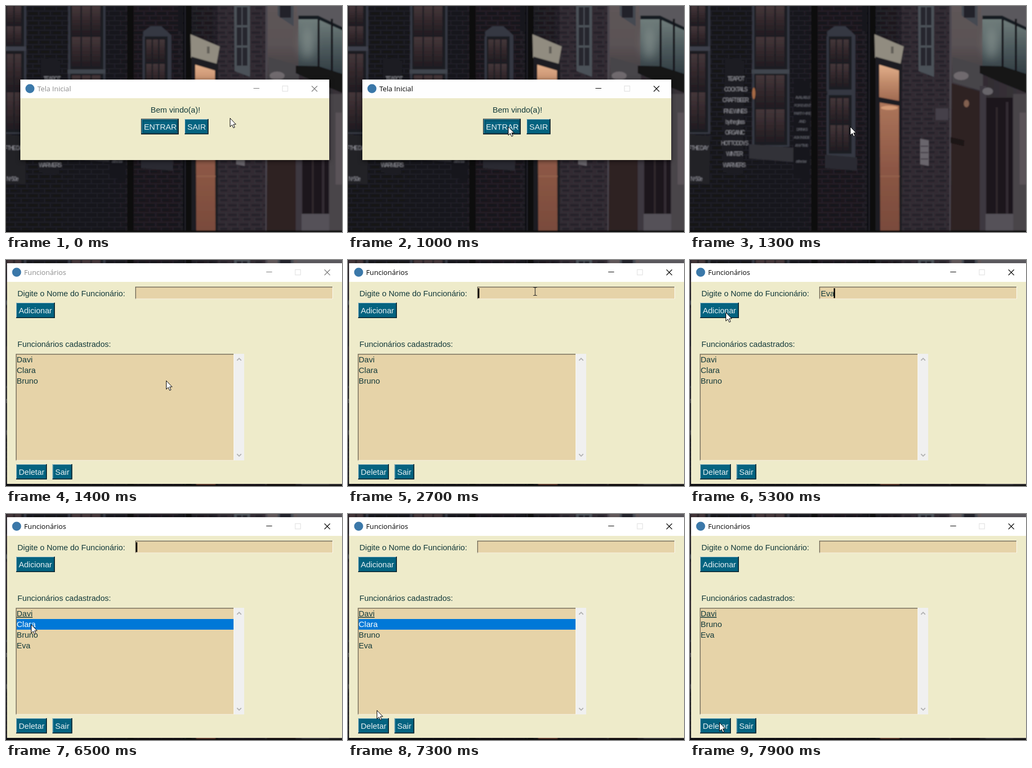
An HTML page that plays this animation: 632 by 424 pixels, repeating every 8 s.

```html
<!DOCTYPE html>
<html lang="pt">
<head>
<meta charset="utf-8">
<style>
html, body { margin: 0; width: 100%; height: 100%; overflow: hidden; background: #17161b; }
svg { position: absolute; left: 0; top: 0; width: 632px; height: 424px; }
text { white-space: pre; }
.ui text { font: 15px "Liberation Sans", Arial, sans-serif; fill: #12393a; }
.ui .title { font: 13.2px "Open Sans", "Noto Sans", sans-serif; fill: #000; }
.ui .btn text { fill: #e9f1f3; }
.ctl { fill: none; stroke: #000; stroke-width: 1.1; }
.idle .title { fill: #8b8b8b; }
.idle .ctl { stroke: #777; }
.chalk text { font: 10px "Liberation Sans", Arial, sans-serif; letter-spacing: -1.5px; fill: #96969e; text-anchor: middle; }
.chalk .small { font-size: 7px; letter-spacing: -1px; fill: #70717a; }
#first { filter: drop-shadow(0 2px 4px #0008); }
</style>
</head>
<body>
<svg id="photo" viewBox="0 0 632 424"></svg>
<svg id="stage" class="ui" viewBox="0 0 632 424"></svg>
<script>
const $ = id => document.getElementById(id);
const rect = (x, y, w, h, fill, extra = '') =>
  `<rect x="${x}" y="${y}" width="${w}" height="${h}" fill="${fill}" ${extra}/>`;
const poly = (points, fill) => `<polygon points="${points}" fill="${fill}"/>`;
const oval = (x, y, rx, ry, fill, extra = '') =>
  `<ellipse cx="${x}" cy="${y}" rx="${rx}" ry="${ry}" fill="${fill}" ${extra}/>`;
const label = (x, y, s, extra = '') => `<text x="${x}" y="${y}" ${extra}>${s}</text>`;
const blend = (id, from, mid, to, dir = 'x2="0" y2="1"') =>
  `<linearGradient id="${id}" ${dir}><stop stop-color="${from}"/><stop offset=".5" stop-color="${mid}"/>` +
  `<stop offset="1" stop-color="${to}"/></linearGradient>`;

// ---- street photograph ----
function sash(x, y, w, h, cols, rows) {
  let s = rect(x, y, w, h, '#363943') + rect(x + 4, y, w - 8, h - 3, '#1a1b22');
  const pw = (w - 14) / cols, ph = (h - 12) / rows;
  for (let r = 0; r < rows; r++)
    for (let c = 0; c < cols; c++)
      s += rect(x + 7 + c * pw, y + 6 + r * ph, pw - 2.5, ph - 3, 'url(#pane)');
  return s;
}
const chalk = (x, y, step, lines, cls = '') => `<g class="chalk">` +
  lines.map((s, i) => label(x - i * .4, y + i * step, s, `class="${cls}"`)).join('') + '</g>';

$('photo').innerHTML = '<defs>' +
  blend('wall', '#16151b', '#1b191f', '#3b353b', '') +
  blend('pane', '#45373a', '#33282c', '#211c21') +
  blend('glow', '#ad765b', '#8c5745', '#784a3b') +
  blend('lamp', '#e3b08c', '#c08a6a', '#a06a52') +
  blend('glass', '#727f7d', '#4d5a5d', '#2f3a40') +
  blend('pale', '#5f5759', '#5a5254', '#383339') + `
  <pattern id="brick" width="22" height="18" patternUnits="userSpaceOnUse">
    <path d="M0 .5H22M0 9.5H22M6.5 0V9M17.5 9V18" stroke="#37353f" stroke-width="1.2"/>
    <path d="M7 4H20M0 14H16" stroke="#0c0b11" stroke-width="4" opacity=".5"/></pattern>
  <filter id="soft"><feGaussianBlur stdDeviation=".9"/></filter>
  <filter id="haze" x="-1" y="-1" width="3" height="3"><feGaussianBlur stdDeviation="9"/></filter></defs>
<g filter="url(#soft)">` +
  rect(-20, -20, 680, 460, 'url(#wall)') +
  rect(398, -20, 92, 460, '#312c33') +
  rect(-20, -20, 510, 460, 'url(#brick)', 'opacity=".5"') +
  sash(-20, -6, 58, 88, 3, 2) + sash(-20, 84, 58, 156, 3, 2) +
  rect(-10, 76, 48, 8, '#3e414b') +
  poly('-10,240 38,244 37,335 -10,332', '#202127') + chalk(12, 270, 58, ['OF THE DAY', 'Nº 50e']) +
  poly('66,97 102,103 100,316 62,312', '#1b1c21') +
  chalk(86, 140, 20.2, ['TEAPOT', 'COCKTAILS', 'CRAFT BEER', 'FINE WINES', 'by the glass', 'ORGANIC', 'HOT TODDYS', 'WINTER', 'WARMERS']) +
  sash(117, -6, 70, 128, 3, 2) + sash(117, 124, 70, 140, 3, 2) +
  rect(116, 119, 71, 8, '#41444e') +
  oval(120, 164, 3, 11, '#a76b45') +
  poly('111,259 195,266 195,293 111,286', '#303037') +
  poly('196,138 226,142 225,326 194,323', '#18191f') +
  chalk(212, 174, 15, ['AVAILABLE', 'FOR EVENT', 'PARTY HIRE', 'AND', 'DRINKS', 'ASK INSIDE', 'ANYTIME', '', 'at the bar'], 'small') +
  rect(228, -10, 12, 450, '#08080c') +
  poly('258,48 272,38 292,38 311,55 311,285 258,282', '#363942') +
  sash(257, 57, 51, 103, 3, 2) + sash(257, 167, 51, 113, 3, 2) +
  poly('254,279 314,284 314,309 254,304', '#2c2c33') +
  rect(333, -10, 16, 450, '#0c0c11') + rect(336, -10, 2, 450, '#25262d') + rect(324, -5, 8, 52, '#15161b') +
  poly('347,53 402,76 396,109 348,97', '#918c80') + rect(378, 76, 5, 13, '#625e59') +
  poly('349,95 399,109 398,430 349,430', '#1d1d23') +
  poly('356,110 393,121 393,178 356,171', 'url(#lamp)') +
  poly('357,181 393,187 394,430 358,430', 'url(#glow)') +
  rect(358, 318, 36, 3, '#93604c') + oval(375, 191, 16, 4, '#d39a76') +
  poly('429,-5 459,-5 459,133 430,122', '#4b5159') +
  [0, 1, 2].map(r => [0, 1].map(c => rect(434 + c * 11, 2 + r * 38, 9, 34, '#25272e')).join('')).join('') +
  rect(462, 192, 24, 22, '#453f48') +
  poly('433,249 449,252 449,300 433,297', '#69656c') +
  [262, 274, 286].map(y => rect(434, y, 14, 2, '#403b44')).join('') +
  rect(490, -10, 60, 165, 'url(#pale)') + rect(488, -10, 4, 450, '#4b4750') +
  poly('511,-5 541,-5 541,38 511,18', '#454951') + rect(515, -5, 21, 27, '#22242b') +
  poly('494,96 551,112 551,160 494,143', '#47444a') +
  poly('492,145 546,161 546,430 490,430', '#2f2020') +
  oval(520, 183, 5, 7, '#82604f') +
  poly('490,246 516,252 515,263 490,257', '#1b1719') +
  oval(510, 131, 14, 8, '#6f6a6e') +
  rect(545, 150, 12, 290, '#3c393f') + rect(557, 172, 50, 220, '#1c191e') +
  rect(575, 190, 4, 200, '#2d282c') + rect(594, 180, 5, 210, '#302b30') +
  rect(556, 390, 56, 40, '#555158') + rect(608, 165, 40, 270, '#4a444a') + rect(620, 200, 12, 135, '#5a5359') +
  oval(560, 160, 10, 7, '#67656b') +
  poly('548,-5 640,-5 640,45 587,20 548,20', '#5a585d') +
  poly('550,22 587,22 640,48 640,132 587,115 550,113', 'url(#glass)') +
  oval(567, 70, 12, 30, '#9aa5a0', 'opacity=".55" filter="url(#haze)"') +
  poly('550,18 587,18 640,43 640,49 587,25 550,25', '#191c22') +
  [586, 611].map(x => rect(x, 24, 4, 100, '#15181d')).join('') +
  poly('545,112 588,113 640,130 640,166 588,145 545,126', '#141419') +
  rect(-10, 421, 660, 12, '#08080c') + '</g>';

// ---- windows ----
function button(x, y, w, h, s, id, focus) {
  return `<g class="btn" id="${id}">` + rect(x, y, w, h, '#046380') +
    `<path class="lit" d="M${x + .5} ${y + h}V${y + .5}H${x + w}" fill="none" stroke="#a9c6cf"/>` +
    `<path class="dark" d="M${x} ${y + h - .8}H${x + w - .8}V${y}" fill="none" stroke="#0b1f28" stroke-width="1.6"/>` +
    (focus ? rect(x, y, w, h, 'none', 'stroke="#1c2b30"') +
      rect(x + 3.5, y + 3.5, w - 7, h - 7, 'none', 'stroke="#0b2c38" stroke-dasharray="1 1"') : '') +
    label(x + 5, y + h / 2 + 5.5, s) + '</g>';
}
const sunken = (x, y, w, h) => rect(x, y, w, h, '#e6d3a8') +
  `<path d="M${x + .75} ${y + h}V${y + .75}H${x + w}" fill="none" stroke="#77705f" stroke-width="1.5"/>` +
  `<path d="M${x} ${y + h - .5}H${x + w - .5}V${y}" fill="none" stroke="#fbf9ef"/>`;

function frame(x, y, w, h, title, close) {
  const cy = y + 17, min = close - 109, max = close - 55;
  return rect(x, y, w, h, '#eeebca') + rect(x, y, w, 35, '#fff') +
    `<circle cx="${x + 18}" cy="${cy}" r="8.5" fill="#3b78a9"/>` +
    label(x + 32, cy + 5, title, 'class="title"') +
    `<path class="ctl" d="M${min - 5.5} ${cy - .5}h11M${close - 5} ${cy - 5}l10.5 10.5m0-10.5l-10.5 10.5"/>` +
    rect(max - 5, cy - 5, 10, 10, 'none', 'stroke="#ddd"');
}

$('stage').innerHTML =
  `<g id="first">` + frame(27, 138, 581, 151, 'Tela Inicial', 580) +
  label(272, 200, 'Bem vindo(a)!') +
  button(254.5, 212, 70, 28.5, 'ENTRAR', 'enter', true) + button(336, 212, 45, 28.5, 'SAIR', 'quit') + '</g>' +
  `<g id="second">` + frame(2, 6, 640, 414, 'Funcionários', 604) +
  label(21.5, 67.5, 'Digite o Nome do Funcionário:') + sunken(243, 50, 372, 23.5) +
  label(246, 67.5, '', 'id="field"') + rect(244.5, 53, 2.5, 18.5, '#000', 'id="caret"') +
  button(19, 80, 73, 29, 'Adicionar', 'add') +
  label(21.5, 163, 'Funcionários cadastrados:') + sunken(18.5, 176, 410.5, 200.5) +
  rect(429, 176, 19, 200, '#f0f0f0') +
  '<path d="M434.5 188.5l4-4 4 4M434.5 364l4 4 4-4" fill="none" stroke="#b3b3b3" stroke-width="1.8"/>' +
  rect(20, 197, 408, 20, '#0078d7', 'id="mark"') +
  [0, 1, 2, 3].map(i => label(20, 192 + i * 19.9, '', `id="row${i}"`)).join('') +
  button(19, 383, 58, 28.5, 'Deletar', 'del') + button(87.5, 383, 37, 28.5, 'Sair', 'exit') + '</g>' +
  `<g id="mouse"><path id="arrow" d="M.5 .5V16.5L4.2 13 6.8 18.7 9.3 17.6 6.8 12H11.5Z" fill="#fff" stroke="#000"/>
   <path id="beam" d="M-3.5 -7.5H-1L0 -6.5 1 -7.5H3.5M0 -6.5V6.5M-3.5 7.5H-1L0 6.5 1 7.5H3.5" fill="none" stroke="#222" stroke-width="1.1"/></g>`;

// ---- motion ----
const path = [[100, 421, 210], [800, 301, 226], [1700, 301, 226], [2300, 352, 59], [3800, 352, 59],
  [4700, 67, 98], [5600, 67, 98], [6400, 47, 207], [6600, 47, 207], [7500, 55, 391]];
const keys = [3000, 3200, 3500];
const staff = ['Davi', 'Clara', 'Bruno'], added = 'Eva';

function pointer(t) {
  const i = path.findIndex(p => p[0] > t);
  if (i < 1) return path.at(i).slice(1);
  const [a, b] = [path[i - 1], path[i]];
  let k = (t - a[0]) / (b[0] - a[0]);
  k = k * k * (3 - 2 * k);
  return [a[1] + (b[1] - a[1]) * k, a[2] + (b[2] - a[2]) * k];
}
const show = (id, on) => $(id).style.display = on ? '' : 'none';
function press(id, down) {
  $(id).querySelector('.lit').style.stroke = down ? '#0b1f28' : '';
  $(id).querySelector('.dark').style.stroke = down ? '#a9c6cf' : '';
}

function draw(t) {
  const within = (a, b) => t >= a && t < b;
  show('first', t < 1200);
  $('first').style.opacity = Math.min(1, Math.max(0, (1200 - t) / 200));
  $('first').classList.toggle('idle', t < 900);
  show('second', t >= 1400);
  $('second').classList.toggle('idle', t < 2400);
  press('enter', within(900, 1000));
  press('add', within(5400, 5500));
  press('del', within(7700, 7900));

  const typed = t < 5500 ? keys.filter(k => t >= k).length : 0;
  $('field').textContent = added.slice(0, typed);
  const since = [2400, ...keys].filter(k => t >= k).pop();
  show('caret', within(2400, 6600) && (t - since) % 900 < 600);
  $('caret').setAttribute('x', 244.5 + (typed ? $('field').getComputedTextLength() : 0));

  let list = t >= 5500 ? [...staff, added] : staff;
  if (t >= 7900) list = list.filter(s => s !== staff[1]);
  const chosen = within(6500, 7900);
  for (let i = 0; i < 4; i++) $('row' + i).textContent = list[i] || '';
  $('row0').style.textDecoration = t >= 6500 ? 'underline' : 'none';
  $('row1').style.fill = chosen ? '#fff' : '';
  show('mark', chosen);

  const [x, y] = pointer(t);
  const onField = t >= 1400 && x > 243 && x < 615 && y > 50 && y < 73;
  show('beam', onField);
  show('arrow', !onField);
  $('mouse').setAttribute('transform', `translate(${x} ${y})`);
}
function tick() {
  draw(performance.now() % 8000);
  requestAnimationFrame(tick);
}
tick();
</script>
</body>
</html>
```
